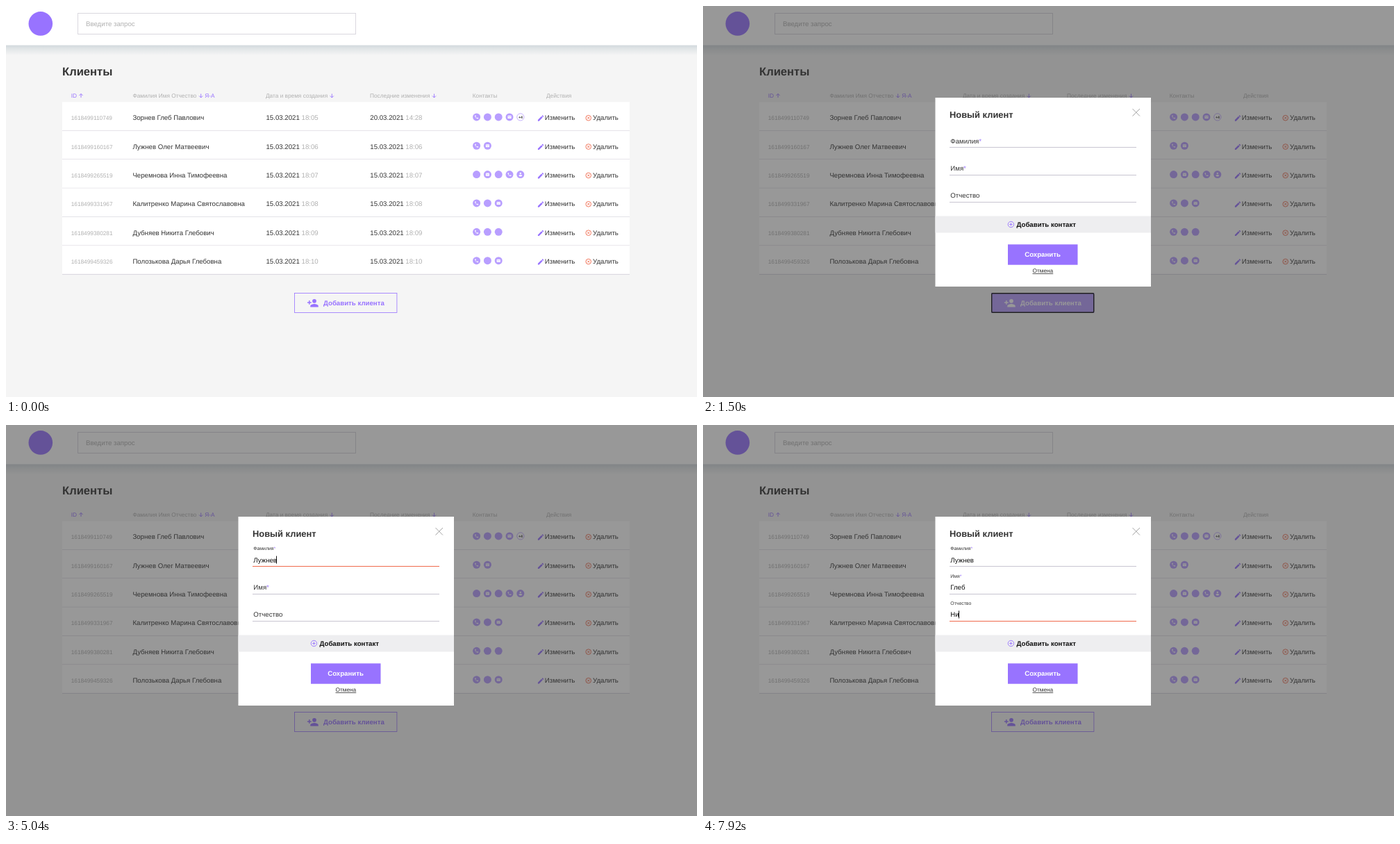
An HTML page with a canvas that plays this animation: 995x563 px, repeating every 8 s.

```html
<!DOCTYPE html>
<html lang="ru">
<head>
<meta charset="utf-8">
<title>Клиенты</title>
<style>
  html, body { margin: 0; width: 100%; height: 100%; overflow: hidden; }
  canvas { display: block; }
</style>
</head>
<body>
<canvas id="stage" width="995" height="563"></canvas>
<script>
const ctx = document.getElementById('stage').getContext('2d');
ctx.textRendering = 'geometricPrecision';
const LOOP = 8000, STEP = 60;
const PURPLE = '#9873ff', LILAC = '#b89eff', RED = '#f06a4d';
const INK = '#333', GRAY = '#b0b0b0', LINE = '#c8c5d1';
const BODY = 9.67, SMALL = 8.29, TINY = 6.9;

const ICONS = {
  phone: new Path2D('M6.62 10.79c1.44 2.83 3.76 5.14 6.59 6.59l2.2-2.2c.27-.27.67-.36 1.02-.24 1.12.37 2.33.57 3.57.57.55 0 1 .45 1 1V20c0 .55-.45 1-1 1-9.39 0-17-7.61-17-17 0-.55.45-1 1-1h3.5c.55 0 1 .45 1 1 0 1.25.2 2.45.57 3.57.11.35.03.74-.25 1.02z'),
  mail: new Path2D('M4 4h16a2 2 0 0 1 2 2v12a2 2 0 0 1-2 2H4a2 2 0 0 1-2-2V6a2 2 0 0 1 2-2zM20 7v2l-8 5-8-5V7l8 5z'),
  pencil: new Path2D('M3 17.25V21h3.75L17.81 9.94l-3.75-3.75zM20.71 7.04a1 1 0 0 0 0-1.41l-2.34-2.34a1 1 0 0 0-1.41 0l-1.83 1.83 3.75 3.75z'),
  addUser: new Path2D('M15 12a4 4 0 1 0 0-8 4 4 0 0 0 0 8zM6 10V7H4v3H1v2h3v3h2v-3h3v-2zM15 14c-2.67 0-8 1.34-8 4v2h16v-2c0-2.66-5.33-4-8-4z'),
  user: new Path2D('M12 11a3.5 3.5 0 1 0 0-7 3.5 3.5 0 0 0 0 7zM12 13c-2.5 0-7 1.2-7 3.5 2 3 4.5 4 7 4s5-1 7-4c0-2.3-4.5-3.5-7-3.5z')
};

// p: phone, m: mail, u: user, o: plain badge, +: more
const CLIENTS = [
  ['1618499110749', 'Зорнев Глеб Павлович', '18:05', '20.03.2021', '14:28', 'poom+'],
  ['1618499160167', 'Лужнев Олег Матвеевич', '18:06', '15.03.2021', '18:06', 'pm'],
  ['1618499265519', 'Черемнова Инна Тимофеевна', '18:07', '15.03.2021', '18:07', 'omopu'],
  ['1618499331967', 'Калитренко Марина Святославовна', '18:08', '15.03.2021', '18:08', 'pom'],
  ['1618499380281', 'Дубняев Никита Глебович', '18:09', '15.03.2021', '18:09', 'poo'],
  ['1618499459326', 'Полозькова Дарья Глебовна', '18:10', '15.03.2021', '18:10', 'pom']
];

const FIELDS = [
  { label: 'Фамилия', star: '*', value: 'Лужнев', focus: 2280, blur: 5640, keys: [3300, 3720, 4380, 4680, 4860, 5040] },
  { label: 'Имя', star: '*', value: 'Глеб', focus: 5640, blur: 7200, keys: [6120, 6240, 6600, 6720] },
  { label: 'Отчество', star: '', value: 'Ни', focus: 7200, blur: LOOP, keys: [7740, 7920] }
];

const clamp = v => Math.min(1, Math.max(0, v));
const mix = (a, b, p) => a + (b - a) * p;

function text(str, x, y, size = BODY, color = INK, weight = 400) {
  ctx.font = `${weight} ${size}px "Liberation Sans", Arial, sans-serif`;
  ctx.fillStyle = color;
  ctx.fillText(str, x, y);
  return x + ctx.measureText(str).width;
}

function rect(x, y, w, h, color) {
  ctx.fillStyle = color;
  ctx.fillRect(x, y, w, h);
}

function frame(x, y, w, h, color, width) {
  ctx.strokeStyle = color;
  ctx.lineWidth = width;
  ctx.strokeRect(x, y, w, h);
}

function disc(x, y, r, color) {
  ctx.fillStyle = color;
  ctx.beginPath();
  ctx.arc(x, y, r, 0, 7);
  ctx.fill();
}

function ring(x, y, r, color, width = .9) {
  ctx.strokeStyle = color;
  ctx.lineWidth = width;
  ctx.beginPath();
  ctx.arc(x, y, r, 0, 7);
  ctx.stroke();
}

function lines(d, color, width = .9) {
  ctx.strokeStyle = color;
  ctx.lineWidth = width;
  ctx.stroke(new Path2D(d));
}

function icon(name, x, y, scale, color) {
  ctx.save();
  ctx.translate(x, y);
  ctx.scale(scale, scale);
  ctx.fillStyle = color;
  ctx.fill(ICONS[name], 'evenodd');
  ctx.restore();
}

function arrow(x, y, dir) {
  lines(`M${x} ${y - 2.7}v5.4M${x - 2.6} ${y + .2 * dir}l2.6 ${2.6 * dir}l2.6 ${-2.6 * dir}`, PURPLE);
}

function badge(kind, x, y) {
  if (kind === '+') {
    ring(x, y, 5.1, LILAC, .8);
    text('+4', x - 2.9, y + 2, 5.3, INK, 700);
    return;
  }
  disc(x, y, 5.5, LILAC);
  if (kind === 'p') icon('phone', x - 3.3, y - 3.3, .275, '#fff');
  if (kind === 'm') icon('mail', x - 3.1, y - 3.1, .26, '#fff');
  if (kind === 'u') icon('user', x - 4.2, y - 4.2, .35, '#fff');
}

function drawHeader() {
  const shadow = ctx.createLinearGradient(0, 56, 0, 71);
  shadow.addColorStop(0, '#d0d7dc');
  shadow.addColorStop(.4, '#e2e6e8');
  shadow.addColorStop(1, '#f5f5f5');
  rect(0, 56, 995, 15, shadow);
  rect(0, 0, 995, 56.5, '#fff');
  disc(49.8, 25.4, 17.3, PURPLE);
  frame(103.5, 10.5, 400, 30, '#dad8df', 1);
  text('Введите запрос', 115, 29, BODY, GRAY);
}

function drawTable() {
  text('Клиенты', 81, 100.3, 16.6, INK, 700);
  text('ID', 93.7, 132, SMALL, PURPLE);
  arrow(108, 129.2, -1);
  text('Фамилия Имя Отчество', 182.4, 132, SMALL, GRAY);
  arrow(280.7, 129.2, 1);
  text('Я-А', 286.3, 132.3, SMALL, PURPLE);
  text('Дата и время создания', 374, 132, SMALL, GRAY);
  arrow(469.3, 129.2, 1);
  text('Последние изменения', 524, 132, SMALL, GRAY);
  arrow(616.5, 129.2, 1);
  text('Контакты', 671.8, 132, SMALL, GRAY);
  text('Действия', 778, 132, SMALL, GRAY);

  CLIENTS.forEach(([id, name, created, date, time, contacts], i) => {
    const top = 138.3 + 41.36 * i, base = top + 26;
    rect(81, top, 817, 41.4, '#fff');
    rect(81, top + 40.8, 817, .9, '#d3d0da');
    text(id, 93.7, base, SMALL, GRAY);
    text(name, 182.4, base);
    text(' ' + created, text('15.03.2021', 374.5, base), base, BODY, GRAY);
    text(' ' + time, text(date, 524.3, base), base, BODY, GRAY);
    [...contacts].forEach((kind, k) => badge(kind, 677.6 + 15.8 * k, top + 21.6));
    icon('pencil', 764.5, top + 17.7, .46, PURPLE);
    text('Изменить', 775.8, base);
    const y = top + 22.9;
    ring(838.7, y, 3.8, RED);
    lines(`M837.2 ${y - 1.5}l3 3m0 -3l-3 3`, RED);
    text('Удалить', 845, base);
  });
}

function drawAddButton(t) {
  const hover = t < 1500 ? clamp((t - 1200) / 240) : clamp((1620 - t) / 120);
  const channel = (a, b) => Math.round(mix(a, b, hover));
  const color = `rgb(${channel(152, 255)},${channel(115, 255)},255)`;
  rect(415.5, 413.5, 147.4, 28, `rgba(184,158,255,${hover})`);
  frame(415.5, 413.5, 147.4, 28, PURPLE, .8);
  if (t >= 1440 && t < 2280) {
    ctx.strokeStyle = '#101010';
    ctx.lineWidth = 1.4;
    ctx.beginPath();
    ctx.roundRect(415.7, 413.8, 147, 27.5, 1.5);
    ctx.stroke();
  }
  icon('addUser', 433.2, 419, .72, color);
  text('Добавить клиента', 457, 431, BODY, color, 700);
}

function drawField(field, i, t) {
  const base = 197.6 + 39.4 * i;
  const focused = t >= field.focus && t < field.blur;
  const lift = clamp((t - field.focus + STEP) / 240);
  const labelY = base - 17.2 * lift, size = mix(BODY, TINY, lift);
  text(field.star, text(field.label, 356.3, labelY, size, INK), labelY, size, PURPLE);
  rect(355, Math.round(base + 5.8), 269, 1, focused ? RED : LINE);

  const typed = field.keys.filter(k => k <= t);
  const end = text(field.value.slice(0, typed.length), 356.3, base, BODY, '#111');
  const sinceKey = t - Math.max(field.focus, ...typed);
  if (focused && sinceKey % 1020 < 480) rect(Math.floor(end), base - 9, 1, 11, '#111');
}

function drawModal(t) {
  rect(0, 0, 995, 563, 'rgba(51,51,51,.5)');
  rect(334.5, 132, 310.5, 272, '#fff');
  text('Новый клиент', 355, 160.8, 12.9, INK, 700);
  lines('M618.5 148l10.5 10.5m0 -10.5l-10.5 10.5', '#999');
  FIELDS.forEach((field, i) => drawField(field, i, t));

  rect(334.5, 302.5, 310.5, 24, '#eeeef0');
  ring(443.4, 314.5, 4.2, PURPLE);
  lines('M441.2 314.5h4.4m-2.2 -2.2v4.4', PURPLE);
  text('Добавить контакт', 451.5, 317.8, BODY, '#111', 700);
  rect(439, 343.3, 100.5, 29.4, PURPLE);
  text('Сохранить', 463.2, 361.3, BODY, '#fff', 700);
  const right = text('Отмена', 474.5, 383.8, SMALL);
  rect(474.5, 385, right - 474.5, .8, INK);
}

function draw(now) {
  const t = Math.floor(now % LOOP / STEP) * STEP;
  rect(0, 0, 995, 563, '#f5f5f5');
  drawHeader();
  drawTable();
  drawAddButton(t);
  if (t >= 1500) drawModal(t);
  requestAnimationFrame(draw);
}
requestAnimationFrame(draw);
</script>
</body>
</html>
```
